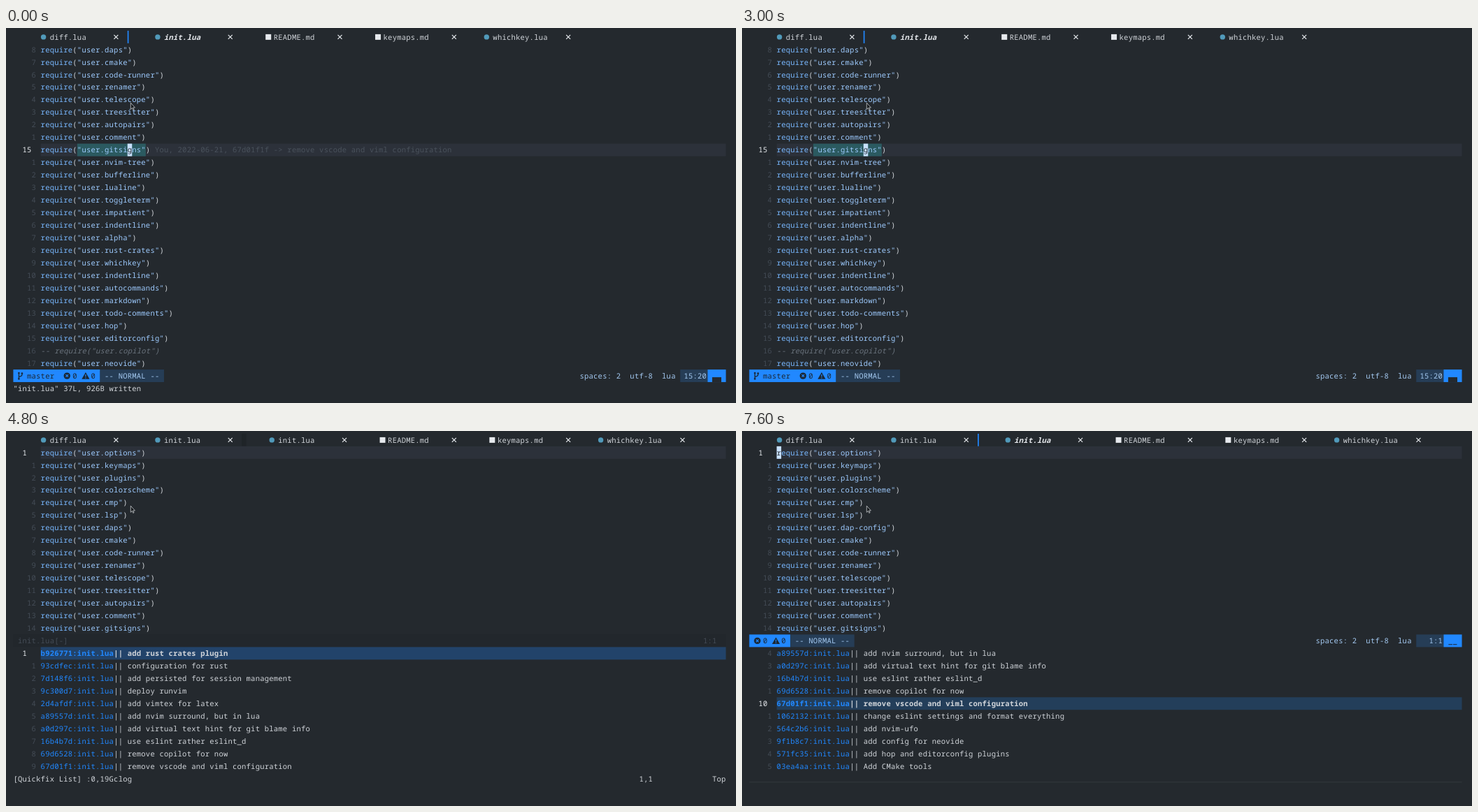
Recreate the animation shown at these times as an HTML page. Size 1044 px wide and 537 px high, loop 8000 ms.

```html
<!DOCTYPE html>
<html lang="en">
<head>
<meta charset="utf-8">
<title>Editor git log</title>
<style>
  html, body { margin: 0; width: 100%; height: 100%; overflow: hidden; background: #24292e; }
  svg { display: block; width: 1044px; height: 537px; }
  text {
    font-family: "Noto Sans Mono", "DejaVu Sans Mono", monospace;
    font-size: 10.5px; letter-spacing: .233px;
    white-space: pre; text-rendering: geometricPrecision;
  }
  .b { font-weight: 700; }
  .i { font-style: italic; }
</style>
</head>
<body>
<svg id="stage" viewBox="0 0 1044 537" xmlns="http://www.w3.org/2000/svg"></svg>
<script>
const LOOP = 8000;
const CW = 6.533, LH = 17.97, X0 = 10.4, Y0 = 3.9, COLS = 156;
const C = {
  bg: '#24292e', dark: '#1f2428', fg: '#d1d5da', white: '#e6e9ed', blue: '#2188ff',
  fn: '#79b8ff', str: '#9ecbff', nr: '#444c56', line: '#2c313a', mark: '#2b5a60',
  cur: '#c8e1ff', band: '#233e5a', bandLit: '#22436a', section: '#263d56', soft: '#a3c8f0',
  gray: '#6a737d', red: '#f97583', ink: '#1b2733', lua: '#519aba'
};

const MODULES = ('options keymaps plugins colorscheme cmp lsp daps cmake code-runner renamer ' +
  'telescope treesitter autopairs comment gitsigns nvim-tree bufferline lualine toggleterm ' +
  'impatient indentline alpha rust-crates whichkey indentline autocommands markdown ' +
  'todo-comments hop editorconfig copilot neovide').split(' ');

const COMMITS = [
  'b926771 add rust crates plugin',
  '93cdfec configuration for rust',
  '7d148f6 add persisted for session management',
  '9c300d7 deploy runvim',
  '2d4afdf add vimtex for latex',
  'a89557d add nvim surround, but in lua',
  'a0d297c add virtual text hint for git blame info',
  '16b4b7d use eslint rather eslint_d',
  '69d6528 remove copilot for now',
  '67d01f1 remove vscode and viml configuration',
  '1062132 change eslint settings and format everything',
  '564c2b6 add nvim-ufo',
  '9f1b8c7 add config for neovide',
  '571fc35 add hop and editorconfig plugins',
  '03ea4aa Add CMake tools'
];
const COMMIT_TOTAL = 25;

const MENU = [
  [6, ['b Checkout branch', 'c Checkout commit', 'd Diff With', 'f File history']],
  [32, ['g Lazygit', 'j Next Hunk', 'k Prev Hunk', 'l Git Log Information']],
  [60, ['L Git Blame Information', 'o Open changed file', 'p Preview Hunk', 'P Push...']],
  [88, ['r Reset Hunk', 'R Reset Buffer', 's Stage Hunk', 'u Undo Stage Hunk']]
];

// name, icon column, close column
const TABS_A = [['diff.lua', 6, 22], ['init.lua', 31, 47], ['README.md', 55, 71],
  ['keymaps.md', 79, 96], ['whichkey.lua', 103, 121]];
const TABS_B = [['diff.lua', 6, 22], ['init.lua', 31, 47], ['init.lua', 56, 72],
  ['README.md', 80, 96], ['keymaps.md', 104, 121], ['whichkey.lua', 128, 146]];

const x = col => X0 + col * CW;
const y = row => Y0 + row * LH;
const n = v => v.toFixed(2);
const esc = s => s.replace(/&/g, '&amp;').replace(/</g, '&lt;').replace(/>/g, '&gt;');

const box = (px, py, w, h, fill) =>
  `<rect x="${n(px)}" y="${n(py)}" width="${n(w)}" height="${n(h)}" fill="${fill}"/>`;
const cells = (row, col, count, fill) => box(x(col), y(row), count * CW, LH, fill);
const text = (row, col, s, fill = C.fg, cls = '') =>
  `<text x="${n(x(col))}" y="${n(y(row) + 12.7)}" fill="${fill}" class="${cls}" xml:space="preserve">${esc(s)}</text>`;
const stroke = (d, color, w = 1) =>
  `<path d="${d}" fill="none" stroke="${color}" stroke-width="${w}"/>`;

function cursor(row, col, ch, fill = C.cur) {
  return cells(row, col, 1, fill) + text(row, col, ch, C.bg);
}

function lineNumber(row, line, current) {
  if (line === current) return text(row, 2, String(line), C.white);
  const d = String(Math.abs(line - current));
  return text(row, 5 - d.length, d, C.nr);
}

function tabs(list, active, barCol) {
  let out = '';
  list.forEach(([name, col, close], i) => {
    const on = i === active, cy = y(0) + 9, cx = x(close) + CW / 2;
    out += name.endsWith('.md')
      ? box(x(col) + 1.5, cy - 4, 8, 8, C.white)
      : `<circle cx="${n(x(col) + 4)}" cy="${n(cy)}" r="3.7" fill="${C.lua}"/>`;
    out += text(0, col + 2, name, on ? C.white : C.fg, on ? 'b i' : '');
    out += stroke(`M${n(cx - 3)} ${n(cy - 3)}l6 6m0-6l-6 6`, C.white, 1.2);
  });
  return out + (active < 0 ? cells(0, barCol, 1, C.dark) : box(x(barCol), y(0), 1.7, LH, C.blue));
}

function code(row, line, module, hot) {
  if (module === 'copilot') return text(row, 6, '-- require("user.copilot")', C.gray, 'i');
  const s = `"user.${module}"`;
  return (hot ? cells(row, 14, s.length, C.mark) : '') +
    text(row, 6, 'require', C.fn) + text(row, 13, '(') +
    text(row, 14, s, C.str) + text(row, 14 + s.length, ')');
}

function buffer(s) {
  let out = '';
  for (let i = 0; i < s.rows; i++) {
    const line = s.top + i, row = 1 + i;
    let module = MODULES[line - 1];
    if (s.older && line === 7) module = 'dap-config';
    if (line === s.line) out += cells(row, 6, COLS - 6, C.line);
    out += lineNumber(row, line, s.line) + code(row, line, module, s.hot && line === s.line);
  }
  return out;
}

function diagnostics(row, col) {
  const cy = y(row) + 9, ex = x(col) + 5, tx = x(col + 4) + 5.5;
  return `<circle cx="${n(ex)}" cy="${n(cy)}" r="4.7" fill="${C.ink}"/>` +
    stroke(`M${n(ex - 1.8)} ${n(cy - 1.8)}l3.6 3.6m0-3.6l-3.6 3.6`, C.blue, 1.2) +
    `<path d="M${n(tx)} ${n(cy - 5)}l5.6 9.6h-11.2z" fill="${C.ink}"/>` +
    stroke(`M${n(tx)} ${n(cy - 2)}v3.4m0 1v1.3`, C.blue, 1.2) +
    text(row, col + 2, '0', C.ink) + text(row, col + 6, '0', C.ink);
}

function statusLine(row, branch, pos) {
  const a = branch ? 19 : 9;
  let out = cells(row, 0, a, C.blue) + cells(row, a, 14, C.section) + text(row, a + 1, '-- NORMAL --', C.soft);
  if (branch) {
    const bx = x(1) + 1.5, by = y(row) + 5;
    out += stroke(`M${n(bx)} ${n(by)}v8.5M${n(bx + 4.5)} ${n(by + 1)}v1.5q0 2-4.5 3`, C.ink, 1.3);
    for (const [dx, dy] of [[0, 0], [4.5, .5], [0, 8.3]])
      out += `<circle cx="${n(bx + dx)}" cy="${n(by + dy)}" r="1.3" fill="${C.ink}"/>`;
    out += text(row, 3, 'master', C.ink);
  }
  out += diagnostics(row, branch ? 11 : 1);
  out += text(row, 124, 'spaces: 2', C.soft) + text(row, 135, 'utf-8', C.soft) + text(row, 142, 'lua', C.soft);
  out += cells(row, 146, 6, C.section) + text(row, 152 - 1 + .8 - pos.length, pos, C.soft);
  out += cells(row, 152, 4, C.blue);
  return out + (branch
    ? box(x(153), y(row) + 11, CW * 2, LH - 11, C.bg)
    : box(x(153) + .4, y(row) + 13.8, 5.6, 1, C.ink) + box(x(154) + .4, y(row) + 13.8, 5.6, 1, C.ink));
}

function quickfix(q) {
  let out = '';
  for (let i = 0; i < 10; i++) {
    const line = q.top + i, row = 17 + i, on = line === q.pick;
    const [hash, ...msg] = COMMITS[line - 1].split(' ');
    const cls = on ? 'b' : '';
    if (on) out += cells(row, 6, COLS - 6, q.focus ? C.bandLit : C.band);
    else if (line === q.line) out += cells(row, 6, COLS - 6, C.line);
    out += lineNumber(row, line, q.line) + text(row, 6, hash + ':init.lua', C.blue, cls) +
      text(row, 22, '||', C.fg, cls) + text(row, 25, msg.join(' '), C.fg, cls);
    if (q.blink && line === q.line) out += cursor(row, 6, hash[0]);
  }
  if (!q.focus) return out + box(X0, 502.3, COLS * CW, 1, '#33383e');
  const above = q.top - 1, below = COMMIT_TOTAL - q.top - 9;
  const pct = above ? Math.floor(above * 100 / (above + below)) + '%' : 'Top';
  return out + text(27, 0, '[Quickfix List] :0,19Gclog') +
    text(27, 137, q.line + ',1') + text(27, 153, pct);
}

function menu() {
  let out = box(X0, y(17), COLS * CW, LH * 10, C.bg) +
    box(x(1), y(18), (COLS - 2) * CW, LH * 8, C.dark) +
    `<rect x="13.5" y="318.4" width="1012.8" height="161.4" fill="none" stroke="${C.fg}" stroke-width="1.2"/>`;
  for (const [col, items] of MENU)
    items.forEach((item, i) => {
      out += text(20 + i, col, item[0], C.blue) + text(20 + i, col + 2, '→', C.gray) +
        text(20 + i, col + 4, item.slice(2));
    });
  return out + cells(28, 0, 1, C.cur) + text(28, 1, '<leader>', C.red) + text(28, 10, '»', C.gray) +
    text(28, 12, '+Git', C.red) + text(28, 61, '<bs>', C.blue) + text(28, 66, 'go up one level', C.gray) +
    text(28, 82, '<esc>', C.blue) + text(28, 88, 'close', C.gray);
}

const pointer = '<path d="M178.3 107.2v9.2l2.1-1.9 1.4 3 1.3-.6-1.4-2.9h2.7z" fill="#15181b" stroke="#c9cdd1" stroke-width=".8"/>';

// Single window with the edited file
function editing(t) {
  const open = t >= 2400 && t < 3000;
  let out = tabs(TABS_A, 1, 25) + buffer({ top: 7, rows: 26, line: 15, hot: true });
  if (t < 2400) out += text(9, 31, 'You, 2022-06-21, 67d01f1f -> remove vscode and viml configuration', '#4a525c') +
    text(28, 0, '"init.lua" 37L, 926B written');
  if (t >= 1200 && t < 2400) out += text(28, 145, '<20>');
  const off = (t >= 70 && t < 600) || (t >= 1130 && t < 1200);
  if (!off) out += cursor(9, 25, 'g', open ? C.fg : C.cur);
  return out + statusLine(27, true, '15:20') + (open ? menu() : '');
}

// Row in the commit list: one key press per time
const PRESSES = [5730, 5870, 6070, 6200, 6270, 6530, 6670, 6730, 6870];

function browsing(t) {
  const line = 1 + PRESSES.filter(p => t >= p).length;
  const top = line < 7 ? 1 : line - 4;
  const blink = t < 4800 || t >= 5330;
  return tabs(TABS_B, -1, 50) + buffer({ top: 1, rows: 15, line: 1 }) +
    cells(16, 0, COLS, '#22272c') + text(16, 1, 'init.lua[-]', C.nr) + text(16, 151, '1:1', C.nr) +
    quickfix({ top, line, pick: 1, focus: true, blink });
}

function opened(top, line, older) {
  return tabs(TABS_B, 2, 50) + buffer({ top: 1, rows: 15, line: 1, older }) + cursor(1, 6, 'r') +
    statusLine(16, false, '1:1') + quickfix({ top, line, pick: line });
}

function scene(t) {
  if (t < 3070) return editing(t);
  if (t < 3130) return tabs(TABS_A, 1, 25) + buffer({ top: 8, rows: 15, line: 15 }) +
    cursor(9, 25, 't') + statusLine(16, true, '15:20') + quickfix({ top: 1, line: 1, pick: 1 });
  if (t < 3600) return opened(1, 1, false);
  if (t < 7400) return browsing(t);
  return opened(6, 10, true) +
    (t < 7600 ? text(28, 0, '(10 of 25): remove vscode and viml configuration') : '');
}

const stage = document.getElementById('stage');
const start = performance.now();
let last = '';

function frame() {
  const t = (performance.now() - start) % LOOP;
  const view = box(0, 0, 1044, 537, C.bg) + scene(t) + pointer;
  if (view !== last) stage.innerHTML = last = view;
  requestAnimationFrame(frame);
}
frame();
</script>
</body>
</html>
```
